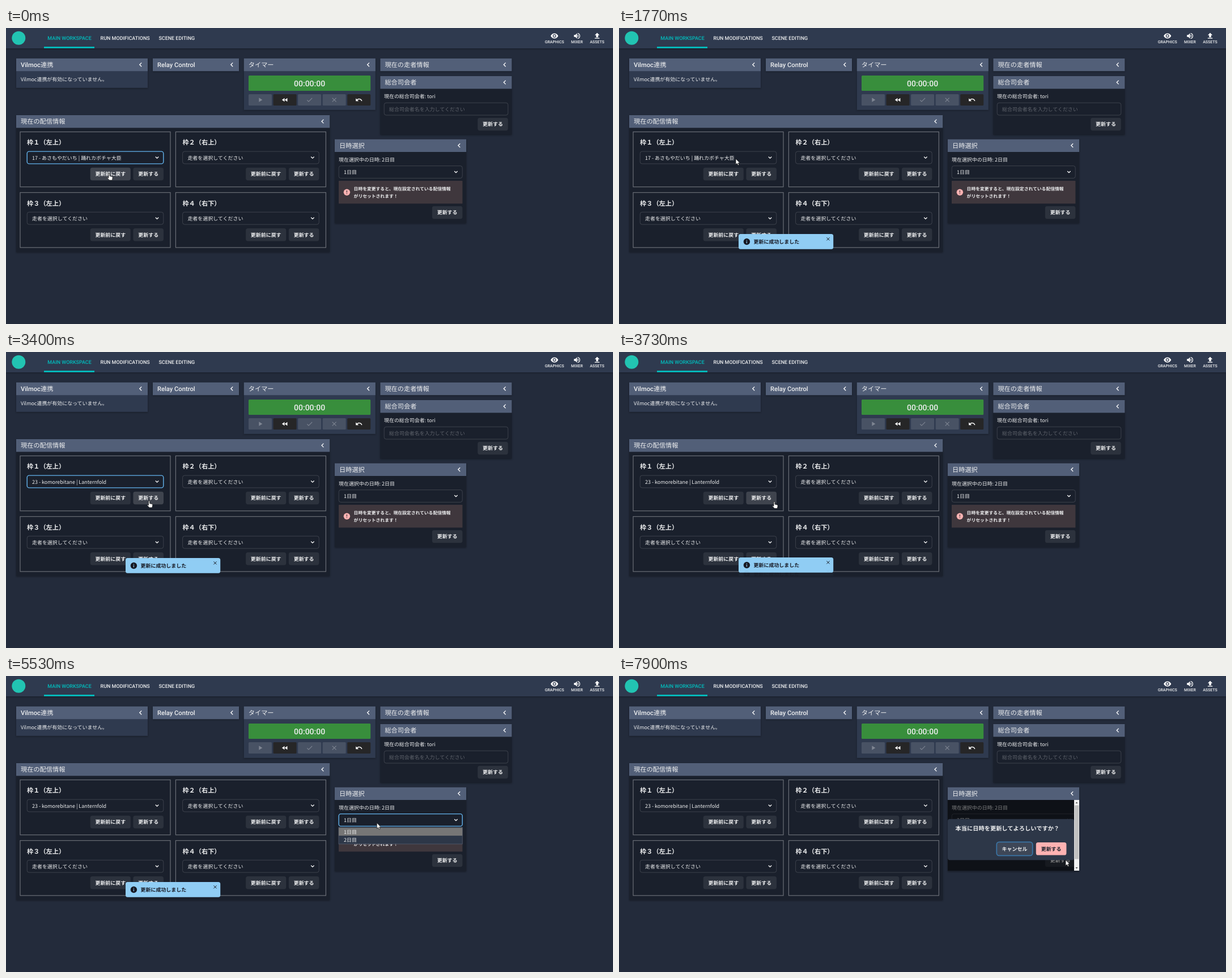
Animation, 1071 px wide and 523 px high, one loop 8000 ms. Source, as an HTML page:

```html
<!DOCTYPE html>
<html lang="ja">
<head>
<meta charset="utf-8">
<title>Dashboard</title>
<style>
html, body { margin: 0; height: 100%; overflow: hidden; background: #232b3b; }
svg { display: block; }
text { font-family: "Noto Sans CJK JP", "Noto Sans CJK", sans-serif; font-weight: 500; fill: #eeeff0; text-rendering: geometricPrecision; white-space: pre; }
.r { font-family: Roboto, "Noto Sans CJK JP", "Noto Sans CJK", sans-serif; }
.n { font-weight: 400; }
.b { font-weight: 700; }
.m { text-anchor: middle; }
.panel { filter: drop-shadow(0 1px 1.5px rgba(0, 0, 0, .35)); }
</style>
</head>
<body>
<svg width="1071" height="523" viewBox="0 0 1071 523">
  <clipPath id="body"><rect x="18" y="176" width="553" height="220"/></clipPath>
  <clipPath id="list"><rect x="37" y="242" width="275" height="280"/></clipPath>
  <g id="base"></g>
  <g id="live"></g>
</svg>
<script>
const LOOP = 8000, ROW = 13.95, DARK = '#1a202c', INK = '#171923', BLUE = '#90cdf4', PINK = '#feb2b2';
const EMPTY = '走者を選択してください';

const options = [
  EMPTY,
  '17 - あさもやだいち | 踊れカボチャ大臣',
  '18 - Quillora | カゼノコレクション アンバー',
  '19 - Tomurelo | Fernlow Meadow',
  '20 - こつぶな | ソラNET将棋 KQ',
  '21 - ポルッカ | 町内のクイズ大会63',
  '22 - KPLnuka | 雷鳴コガネグモン',
  '23 - komorebitane | Lanternfold',
  '24 - tin_cloud | ネジパレス3000',
  '25 - つむぎー | 駒星 -こまぼしや-',
  '26 - ゆめみどり | 風☆雷☆丸マジカルファイターズIII 七色竜王再誕',
  '27 - みなぎ | ワクワクランナー',
  '28 - カネツグ | EMBER ODYSSEY V HD Remaster',
  '29 - ランプル | pawpatches',
  '30 - くみ | グランドリアクロニクルII',
  '31 - いぶき | カエルラリー ターボジャンプ!!',
  '32 - ドン | ルミナ・コンパス(バックアップ)',
  '33 - Vamlo | Biscuit',
  '34 - からめるど | サンシャインビーチテニス',
  '35 - しおむすび | Gallant Turf 6 2031'
];

const icons = {
  eye: 'M12 4.5C7 4.5 2.7 7.6 1 12c1.7 4.4 6 7.5 11 7.5s9.3-3.1 11-7.5c-1.7-4.4-6-7.5-11-7.5zM12 17a5 5 0 1 1 0-10 5 5 0 0 1 0 10zm0-8a3 3 0 1 0 0 6 3 3 0 0 0 0-6z',
  sound: 'M3 9v6h4l5 5V4L7 9zm13.5 3A4.5 4.5 0 0 0 14 8v8a4.5 4.5 0 0 0 2.5-4zM14 3.2v2.1a7 7 0 0 1 0 13.4v2.1a9 9 0 0 0 0-17.6z',
  upload: 'M9 16h6v-6h4l-7-7-7 7h4zm-4 2h14v2H5z',
  play: 'M8 5v14l11-7z',
  rewind: 'M11 18V6l-8.5 6zm.5-6l8.5 6V6z',
  check: 'M9 16.2L4.8 12l-1.4 1.4L9 19 21 7l-1.4-1.4z',
  cross: 'M19 6.4L17.6 5 12 10.6 6.4 5 5 6.4l5.6 5.6L5 17.6 6.4 19l5.6-5.6 5.6 5.6 1.4-1.4-5.6-5.6z',
  undo: 'M12.5 8c-2.7 0-5 1-6.9 2.6L2 7v9h9l-3.6-3.6a8 8 0 0 1 12.7 3.6l2.4-.8A10.5 10.5 0 0 0 12.5 8z'
};

const ARROW = 'M0 0V10.2L2.4 8.1 4 11.6 5.7 10.9 4.2 7.5H7.2Z';
const HAND = 'M-1 1a1 1 0 0 1 2 0V4.6l4 .9q1.4.4 1.2 1.9l-.6 3.5q-.2 1-1.1 1H1q-.7 0-1.2-.6L-3.2 8q-.2-.7.4-.9.7-.2 1.8.9z';

const rect = (x, y, w, h, fill, more = '') =>
  `<rect x="${x}" y="${y}" width="${w}" height="${h}" fill="${fill}" ${more}/>`;
const text = (x, mid, s, size = 8.96, cls = '', more = '') =>
  `<text x="${x}" y="${mid + size * .37}" font-size="${size}" class="${cls}" ${more}>${s}</text>`;
const line = (d, color = '#fff', w = 1.3) =>
  `<path d="${d}" fill="none" stroke="${color}" stroke-width="${w}"/>`;
const icon = (name, x, y, k, fill = '#fff') =>
  `<path d="${icons[name]}" fill="${fill}" transform="translate(${x - 12 * k} ${y - 12 * k}) scale(${k})"/>`;
const white = a => `rgba(255,255,255,${a})`;
const clamp = v => Math.max(0, Math.min(1, v));
const ease = v => (v = clamp(v), v * v * (3 - 2 * v));

function panel(x, y, w, h, title, fill = DARK, cls = 'r n') {
  const c = x + w - 12.5, m = y + 11;
  return `<g class="panel">${rect(x, y, w, h, fill)}</g>` + rect(x, y, w, 22.4, '#525f78') +
    text(x + 8, m, title, 11.2, cls) + line(`M${c + 1.7} ${m - 3.4}l-3.4 3.4 3.4 3.4`);
}

function select(x, y, w, value, focus) {
  const border = focus ? 'stroke="#63b3ed" stroke-width="1.4"' : `stroke="${white(.17)}" stroke-width=".9"`;
  return rect(x + .2, y + .2, w - .4, 21.8, 'none', `rx="3.6" ${border}`) + text(x + 9, y + 11.3, value) +
    line(`M${x + w - 14.2} ${y + 9.6}l2.7 2.7 2.7-2.7`);
}

function scrollbar(x, y, h, thumb) {
  const c = x + 4.5;
  return rect(x, y, 9, h, '#f1f1f1') + rect(x + .8, y + 9.5, 7.4, thumb, '#c1c1c1') +
    `<path d="M${c - 2} ${y + 6}h4l-2-2.4zM${c - 2} ${y + h - 6}h4l-2 2.4z" fill="#505050"/>`;
}

// Four slots in a 2 x 2 grid
const slots = ['枠１（左上）', '枠２（右上）', '枠３（左上）', '枠４（右下）']
  .map((title, i) => ({ title, x: 25 + i % 2 * 274.4, y: 183.5 + (i >> 1) * 107.2 }));

const buttons = slots.flatMap(s => [
  [s.x + 123.7, s.y + 63.3, 71.2, '更新前に戻す'],
  [s.x + 199.4, s.y + 63.3, 53.6, '更新する']
]).concat([[832.2, 158.8, 53.6, '更新する'], [751.8, 314.8, 53.6, '更新する']]);

function drawBase() {
  let s = `<g class="panel">${rect(0, 0, 1071, 36, '#2f3a4f')}</g>` +
    '<circle cx="22.3" cy="17.8" r="12" fill="#22c4b2"/>' +
    text(73.3, 18, 'MAIN WORKSPACE', 8.96, 'r', 'style="fill:#00bebe"') + rect(67, 33, 89, 2.8, '#00bebe') +
    text(166.6, 18, 'RUN MODIFICATIONS', 8.96, 'r') + text(269.4, 18, 'SCENE EDITING', 8.96, 'r');
  [['eye', 967.7, 'GRAPHICS'], ['sound', 1007.5, 'MIXER'], ['upload', 1043, 'ASSETS']].forEach(([name, x, label]) =>
    s += icon(name, x, 14, .6) + text(x, 24.3, label, 7, 'r m'));

  s += panel(18, 53.8, 232, 52, 'Vilmoc連携', '#2f3a4f', 'r') + text(26, 90.5, 'Vilmoc連携が有効になっていません。') +
    panel(259, 53.8, 152, 22.4, 'Relay Control', '#2f3a4f', 'r') +
    panel(419.8, 53.8, 232, 91, 'タイマー', '#2f3a4f') +
    rect(428, 84, 215.2, 27, '#388e3c', 'rx="1.5"') + text(535.6, 97.8, '00:00:00', 14, 'r m');
  ['play', 'rewind', 'check', 'cross', 'undo'].forEach((name, i) => {
    const x = 428 + i * 43.55, on = i % 3 == 1;
    s += rect(x, 117, 41, 20, on ? '#262627' : '#485264', 'rx="1.5"') +
      icon(name, x + 20.5, 127, .55, on ? '#fff' : '#7f8693');
  });

  s += panel(660.4, 53.8, 232, 22.4, '現在の走者情報') +
    panel(660.4, 85, 232, 103.5, '総合司会者') + text(667, 121, '現在の総合司会者: tori') +
    rect(667.2, 132.2, 218.6, 21.8, 'none', `rx="3.6" stroke="${white(.17)}" stroke-width=".9"`) +
    text(676, 143.2, '総合司会者名を入力してください', 8.96, '', `style="fill:${white(.3)}"`) +
    panel(18, 154, 553.2, 242, '現在の配信情報');
  slots.forEach(b => s += rect(b.x, b.y, 265, 97.2, 'none', 'stroke="#6a6e77" stroke-width="1.2"') +
    text(b.x + 12, b.y + 18.7, b.title, 11.2, 'b'));

  return s + panel(580, 196.6, 232, 148.4, '日時選択') + text(587, 233, '現在選択中の日時: 2日目') +
    rect(587, 270, 218.4, 40.3, '#3f373d') + `<circle cx="601.4" cy="290.2" r="5.7" fill="${PINK}"/>` +
    rect(600.8, 287, 1.2, 3.8, '#3f373d') + rect(600.8, 292, 1.2, 1.3, '#3f373d') +
    text(613.6, 284.2, '日時を変更すると、現在設定されている配信情報', 7.8, 'b') +
    text(613.6, 297.2, 'がリセットされます！', 7.8, 'b');
}

// Pointer path: time, x, y
const path = [
  [100, 182, 257], [440, 251, 257], [1430, 251, 257], [1770, 206, 231], [1840, 206, 231], [2200, 203, 342],
  [2390, 203, 342], [3030, 252.5, 263], [3620, 252.5, 263], [4100, 411, 273.5], [4630, 411, 273.5],
  [5130, 654.3, 259.5], [5530, 654.3, 259.5], [6070, 642, 284], [6830, 642, 284], [7270, 788, 325]
];

function pointer(t) {
  const i = path.findIndex(k => k[0] > t);
  if (i <= 0) return path.at(i).slice(1);
  const [a, b] = [path[i - 1], path[i]], p = ease((t - a[0]) / (b[0] - a[0]));
  return [a[1] + (b[1] - a[1]) * p, a[2] + (b[2] - a[2]) * p];
}

const clicks = [470, 3430, 7480];
const between = (t, a, b) => t >= a && t < b;

function toast(t, start, end, y) {
  if (!between(t, start, end + 200)) return '';
  const enter = ease((t - start) / 400), leave = clamp((t - end) / 200) ** 2;
  return `<g opacity="${enter * (1 - leave)}" transform="translate(294.6 ${y + 13.4 + 15 * (1 - enter)}) scale(${1 - .15 * leave})">` +
    rect(-83.6, -13.4, 167.2, 26.8, BLUE, 'rx="3.6"') + `<circle cx="-69.2" cy=".1" r="5.7" fill="${INK}"/>` +
    rect(-69.8, -.6, 1.2, 3.6, BLUE) + rect(-69.8, -3, 1.2, 1.3, BLUE) +
    text(-57, .3, '更新に成功しました', 8.96, 'b', `style="fill:${INK}"`) +
    line('M71.8-7.2l5.2 5.2m0-5.2l-5.2 5.2', INK, 1) + '</g>';
}

function runnerList(y) {
  const hot = y > 243 ? Math.floor((y - 243) / ROW) : 1;
  return rect(37, 242, 284.5, 280.5, '#2d3748', 'stroke="#596273" stroke-width=".7"') + '<g clip-path="url(#list)">' +
    options.map((o, i) => (i == hot ? rect(37, 243 + i * ROW, 276, ROW, '#767676') : '') +
      text(46, 250.1 + i * ROW, o)).join('') + '</g>' + scrollbar(312.3, 242.6, 279.4, 237);
}

function dayList(y) {
  const hot = y > 282 ? 1 : 0;
  return rect(587, 267.5, 218.2, 29.4, '#2d3748', 'stroke="#596273" stroke-width=".7"') +
    rect(587, 268.2 + hot * ROW, 218.2, ROW, '#767676') + text(596, 275.6, '1日目') + text(596, 289.6, '2日目');
}

function dialog(p) {
  return rect(580, 219, 223, 125, '#000', `opacity="${.48 * p}"`) +
    `<g opacity="${p}" transform="translate(691.5 289) scale(${.95 + .05 * p}) translate(-691.5 -289)">` +
    rect(580, 252.8, 223, 72.4, '#2d3748', 'rx="3.6"') +
    text(593.5, 269, '本当に日時を更新してよろしいですか？', 10.24, 'b') +
    rect(666.3, 293.3, 63.4, 24, '#3e4757', 'rx="4.4" stroke="#3a74a5" stroke-width="1.8"') +
    text(698, 305.3, 'キャンセル', 8.96, 'b m') +
    rect(735.8, 294.1, 53.6, 22.4, PINK, 'rx="3.6"') +
    text(762.6, 305.3, '更新する', 8.96, 'b m', `style="fill:${DARK}"`) + '</g>' +
    scrollbar(803, 219, 125, 95);
}

function drawLive(t) {
  const [x, y] = pointer(t);
  const listOpen = between(t, 1800, 2380), dayOpen = between(t, 5340, 6570), asking = t >= 7560;
  const pressed = clicks.some(c => between(t, c, c + 90));
  const over = listOpen || dayOpen || asking ? null
    : buttons.find(([bx, by, w]) => between(x, bx, bx + w) && between(y, by, by + 22.4));

  let s = slots.map((b, i) => select(b.x + 12, b.y + 34.4, 241, i ? EMPTY : options[t < 2380 ? 1 : 7],
    !i && (t < 480 || between(t, 1800, 3440)))).join('');
  s += select(587, 243.4, 218.4, t < 6570 ? '1日目' : '2日目', between(t, 5340, 7490));
  buttons.forEach(b => s += rect(b[0], b[1], b[2], 22.4, white(b == over ? pressed ? .24 : .16 : .08), 'rx="3.6"') +
    text(b[0] + b[2] / 2, b[1] + 11.2, b[3], 8.96, 'b m'));

  s += '<g clip-path="url(#body)">' + toast(t, 600, 4625, 364 - 35.6 * ease((t - 3690) / 400)) +
    toast(t, 3690, 7695, 364) + '</g>';
  if (listOpen) s += runnerList(y);
  if (dayOpen) s += dayList(y);
  if (asking) s += dialog(ease((t - 7560) / 260));
  return s + `<path d="${over ? HAND : ARROW}" transform="translate(${x} ${y})" fill="#fff" stroke="#111" stroke-width=".7"/>`;
}

const live = document.getElementById('live');
document.getElementById('base').innerHTML = drawBase();
function tick() {
  live.innerHTML = drawLive(performance.now() % LOOP);
  requestAnimationFrame(tick);
}
tick();
</script>
</body>
</html>
```
